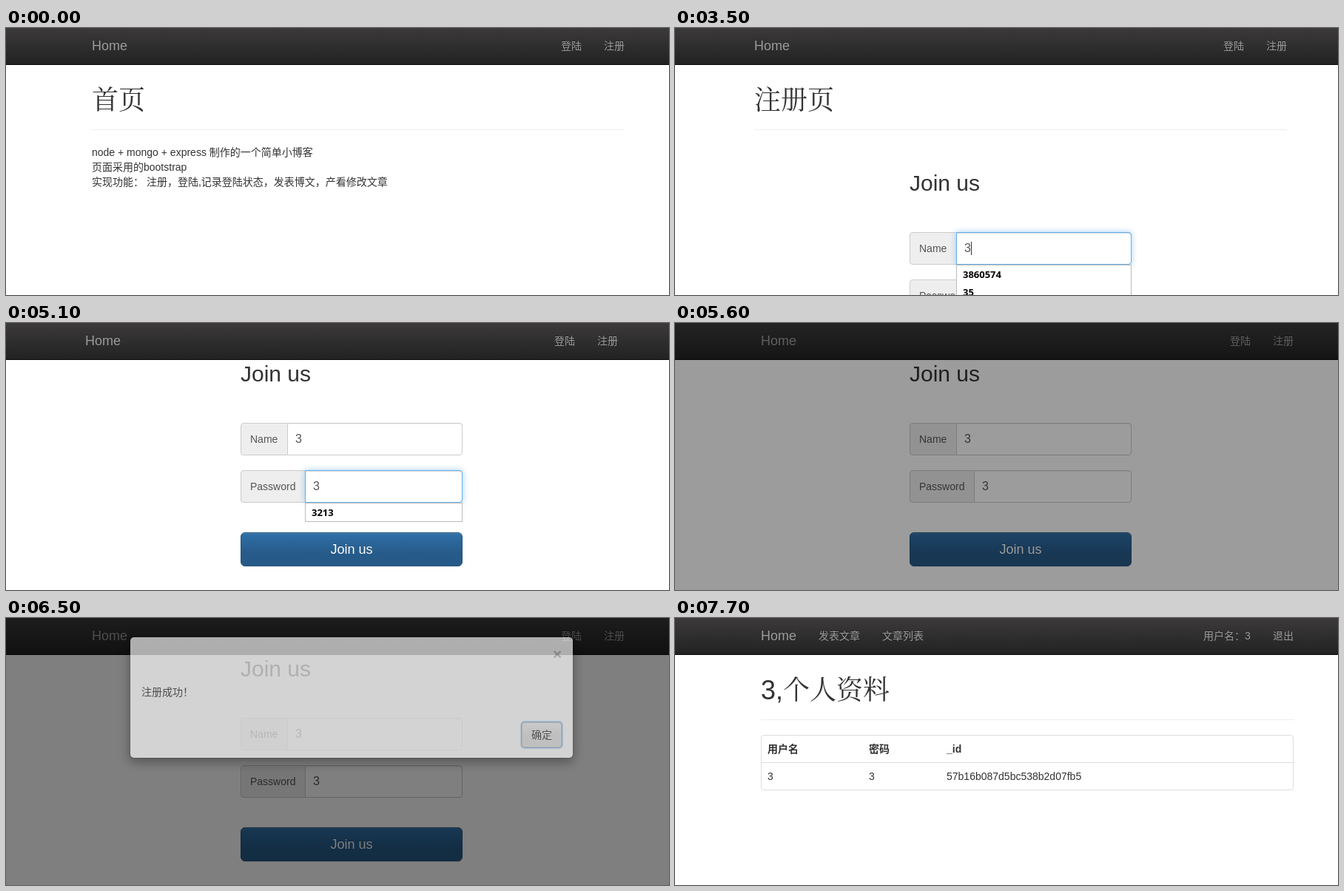
An HTML page for the animation above (8000 ms loop, 896 px wide and 361 px high).

```html
<!DOCTYPE html>
<html lang="zh-CN">
<head>
<meta charset="utf-8">
<title>Blog demo</title>
<style>
* { box-sizing: border-box; }
html, body { margin: 0; width: 100%; height: 100%; overflow: hidden; background: #fff; }
body { font: 14px/20px "Liberation Sans", "Noto Sans CJK SC", "Noto Sans CJK", sans-serif; color: #333; }
#stage { position: relative; width: 896px; height: 361px; overflow: hidden; }
#stage * { position: absolute; white-space: pre; }
.page { inset: 0; visibility: hidden; }
.page.on { visibility: visible; }

.bar { left: 0; top: 0; width: 896px; height: 50px; background: linear-gradient(#3c3a3a, #222); border-bottom: 1px solid #080808; }
.bar a { top: 14px; color: #9d9d9d; text-shadow: 0 -1px 0 rgba(0,0,0,.25); }
.bar .brand { font-size: 18px; }
.bar a.hot { color: #fff; }

h1 { margin: 0; top: 78.4px; font: 300 36px/39.6px "Liberation Sans", "Noto Serif CJK SC", "Noto Sans CJK SC", "Noto Sans CJK", sans-serif; }
h2 { margin: 0; left: 317px; top: 193px; font-size: 30px; line-height: 33px; font-weight: 400; }
.rule { top: 137px; width: 720px; height: 1px; background: #eee; }
.intro { left: 116px; top: 158px; }

.form { left: 0; top: 0; width: 896px; height: 520px; }
.field { left: 317px; width: 300px; height: 44px; }
.label { left: 0; top: 0; width: calc(var(--w) + 1px); height: 44px; padding-left: 12px; line-height: 42px;
  border: 1px solid #ccc; border-radius: 4px 0 0 4px; background: #eee; color: #555; }
.input { left: var(--w); right: 0; top: 0; height: 44px; padding-left: 10px; font-size: 16px; line-height: 42px;
  border: 1px solid #ccc; border-radius: 0 4px 4px 0; background: #fff; color: #555; box-shadow: inset 0 1px 1px rgba(0,0,0,.075); }
.input.empty { color: #999; }
.glow { left: var(--w); right: 0; top: 0; height: 44px; border: 1px solid #66afe9; border-radius: 0 4px 4px 0;
  box-shadow: inset 0 1px 1px rgba(0,0,0,.075), 0 0 8px rgba(102,175,233,.6); }
.caret { top: 13px; width: 1px; height: 18px; background: #333; }
.list { left: var(--w); right: 0; top: 44px; padding: 0 8px; border: 1px solid #bbb; background: #fff; color: #000;
  font: bold 13px/24px "Open Sans", sans-serif; z-index: 2; }
.join { left: 317px; top: 424px; width: 300px; height: 46px; border: 1px solid #245580; border-radius: 6px;
  background: #265a88 linear-gradient(#337ab7, #265a88) repeat-x; color: #fff; font-size: 18px; line-height: 44px; text-align: center;
  text-shadow: 0 -1px 0 rgba(0,0,0,.2); box-shadow: inset 0 1px 0 rgba(255,255,255,.15), 0 1px 1px rgba(0,0,0,.075); }
.join.hot { background-position: 0 -15px; }

#dim { inset: 0; background: #000; }
#modal { left: 167px; top: 29px; width: 600px; height: 165px; border: 1px solid rgba(0,0,0,.2); border-radius: 6px;
  background: #fff; background-clip: padding-box; box-shadow: 0 5px 15px rgba(0,0,0,.5); }
.close { left: 571px; top: 12px; font-size: 21px; line-height: 21px; font-weight: 700; opacity: .25; color: #000; text-shadow: 0 1px 0 #fff; }
.ok { left: 529px; top: 115px; width: 54px; height: 34px; line-height: 32px; text-align: center; border: 1px solid #ccc; border-radius: 4px;
  background: #e0e0e0 linear-gradient(#fff, #e0e0e0) repeat-x; text-shadow: 0 1px 0 #fff; box-shadow: 0 0 2px 1px #5e9ed6; }
.ok.hot { background-position: 0 -15px; }

.table { left: 116px; top: 158px; width: 720px; height: 75px; border: 1px solid #ddd; border-radius: 4px; }
.table hr { left: 0; right: 0; top: 36px; height: 1px; margin: 0; border: 0; background: #ddd; }
.table b { top: 8px; }
.table span { top: 45px; }
.c1 { left: 8px; } .c2 { left: 145px; } .c3 { left: 250px; }
</style>
</head>
<body>
<div id="stage">
  <section class="page" id="home">
    <div class="bar">
      <a class="brand" id="homeBrand" style="left:116px">Home</a>
      <a id="homeLogin" style="left:750px">登陆</a>
      <a id="homeJoin" style="left:808px">注册</a>
    </div>
    <h1 style="left:116px">首页</h1>
    <div class="rule" style="left:116px"></div>
    <div class="intro">node + mongo + express 制作的一个简单小博客
页面采用的bootstrap
实现功能： 注册，登陆,记录登陆状态，发表博文，产看修改文章</div>
  </section>

  <section class="page" id="join">
    <div class="form" id="form">
      <h1 style="left:107px">注册页</h1>
      <div class="rule" style="left:107px"></div>
      <h2>Join us</h2>
      <div class="field" id="name" style="top:276px;--w:63px;z-index:1">
        <div class="label">Name</div><div class="input"></div><div class="glow"></div><div class="caret"></div>
        <div class="list">3860574
35</div>
      </div>
      <div class="field" id="pass" style="top:340px;--w:87px">
        <div class="label">Password</div><div class="input"></div><div class="glow"></div><div class="caret"></div>
        <div class="list">3213</div>
      </div>
      <div class="join" id="send">Join us</div>
    </div>
    <div class="bar">
      <div id="links" style="left:0;top:0">
        <a class="brand" style="left:107px">Home</a>
        <a style="left:741px">登陆</a>
        <a style="left:799px">注册</a>
      </div>
    </div>
    <div id="dim"></div>
    <div id="modal">
      <div class="close">×</div>
      <div style="left:15px;top:64px">注册成功！</div>
      <div class="ok" id="ok">确定</div>
    </div>
  </section>

  <section class="page" id="user">
    <div class="bar">
      <a class="brand" id="userBrand" style="left:116px">Home</a>
      <a id="post" style="left:194px">发表文章</a>
      <a id="posts" style="left:280px">文章列表</a>
      <a style="left:714px">用户名：3</a>
      <a style="left:808px">退出</a>
    </div>
    <h1 style="left:116px">3,个人资料</h1>
    <div class="rule" style="left:116px"></div>
    <div class="table">
      <hr>
      <b class="c1">用户名</b><b class="c2">密码</b><b class="c3">_id</b>
      <span class="c1">3</span><span class="c2">3</span><span class="c3">57b16b087d5bc538b2d07fb5</span>
    </div>
  </section>
</div>

<script>
const LOOP = 8000, STEP = 100;
const $ = id => document.getElementById(id);

const base = {
  page: 'home', hot: '', scroll: 0, caret: '', list: '',
  name: '', pass: '', nameGlow: 0, passGlow: 0, wide: false
};

// Each entry changes part of the state from its time on.
const timeline = [
  [500, { hot: 'homeBrand' }],
  [800, { hot: '' }],
  [1100, { hot: 'homeLogin' }],
  [1400, { hot: 'homeJoin' }],
  [2000, { page: 'join', hot: '', caret: 'name' }],
  [2100, { nameGlow: .6 }],
  [2200, { nameGlow: 1 }],
  [2500, { caret: '' }],
  [2700, { caret: 'name' }],
  [3200, { caret: '' }],
  [3500, { name: '3', caret: 'name', list: 'name' }],
  [3900, { list: '', scroll: 50 }],
  [4000, { caret: '', scroll: 118 }],
  [4100, { scroll: 141 }],
  [4500, { caret: 'pass', nameGlow: .6, passGlow: .4 }],
  [4600, { nameGlow: 0, passGlow: 1 }],
  [4700, { pass: '3', list: 'pass' }],
  [5000, { hot: 'send' }],
  [5100, { caret: '' }],
  [5400, { list: '', passGlow: .4 }],
  [5500, { passGlow: 0, wide: true }],
  [6400, { hot: 'ok' }],
  [6600, { page: 'user', hot: '' }],
  [7100, { hot: 'userBrand' }],
  [7200, { hot: 'post' }],
  [7600, { hot: 'posts' }],
  [7700, { hot: '' }]
];

const ramp = (t, from, length) => Math.min(1, Math.max(0, (t - from) / length));
const easeOut = p => 1 - (1 - p) ** 2;

function dialog(t) {
  if (t >= 6500) return { dim: .5, alpha: .66, y: -4 };
  return {
    dim: .5 * ramp(t, 5483, 150),
    alpha: ramp(t, 5670, 150),
    y: -41 * (1 - easeOut(ramp(t, 5670, 300)))
  };
}

function drawField(id, hint, s) {
  const [, input, glow, caret, list] = $(id).children;
  const value = s[id];
  input.textContent = value || hint;
  input.classList.toggle('empty', !value);
  glow.style.opacity = s[id + 'Glow'];
  caret.style.left = `calc(var(--w) + ${value ? 20 : 11}px)`;
  caret.style.display = s.caret === id ? '' : 'none';
  list.style.display = s.list === id ? '' : 'none';
}

function draw(t) {
  const s = { ...base };
  for (const [at, change] of timeline) if (t >= at) Object.assign(s, change);

  document.querySelectorAll('.page').forEach(p => p.classList.toggle('on', p.id === s.page));
  document.querySelectorAll('.bar a, #send, #ok').forEach(e => e.classList.toggle('hot', !!s.hot && e.id === s.hot));
  $('send').classList.toggle('hot', t >= 5000);
  $('form').style.transform = `translateY(${-s.scroll}px)`;
  $('links').style.left = s.wide ? '9px' : '0';
  drawField('name', 'Username', s);
  drawField('pass', 'Userpassword', s);

  const d = dialog(t);
  $('dim').style.opacity = d.dim;
  $('modal').style.opacity = d.alpha;
  $('modal').style.transform = `translateY(${d.y}px)`;
}

const start = performance.now();
let last = -1;
function tick(now) {
  const t = Math.floor(Math.max(0, now - start) % LOOP / STEP) * STEP;
  if (t !== last) draw(last = t);
  requestAnimationFrame(tick);
}
draw(0);
requestAnimationFrame(tick);
</script>
</body>
</html>
```
